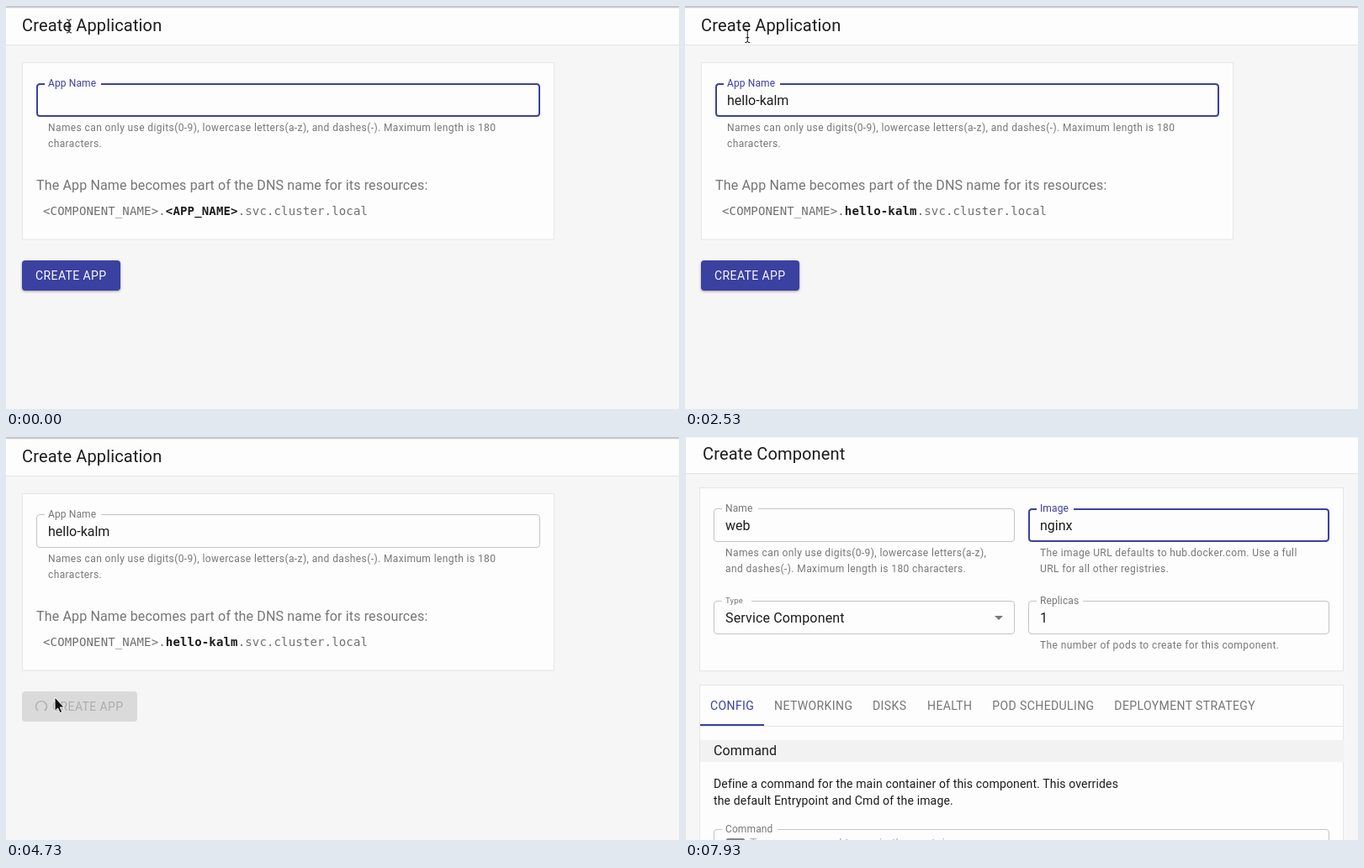
Animation of 800x480 px, one loop 8000 ms. Source, as an HTML page:

```html
<!DOCTYPE html>
<html lang="en">
<head>
<meta charset="utf-8">
<title>Create Application</title>
<style>
html, body { margin: 0; width: 100%; height: 100%; overflow: hidden; background: #f6f6f6; }
svg { display: block; width: 800px; height: 480px; }
text { font-family: Roboto, "Noto Sans", sans-serif; white-space: pre; fill: #1c1c1c; }
.title { font-size: 20px; letter-spacing: .15px; }
.body { font-size: 16px; letter-spacing: .15px; }
.input { font-size: 16px; }
.small { font-size: 14px; letter-spacing: .15px; }
.caps { font-size: 14px; letter-spacing: .4px; }
.help { font-size: 12px; letter-spacing: .4px; fill: #777; }
.label { font-size: 12px; letter-spacing: .11px; fill: #777; }
.label.tiny { font-size: 9.6px; }
.soft { fill: #757575; }
.hint { fill: #adadad; }
.mono { font-family: "DejaVu Sans Mono", monospace; font-size: 14px; letter-spacing: .15px; fill: #707070; }
.mono .name { font-weight: 700; fill: #1c1c1c; }
.active { fill: #3a41a0; }
.paper { fill: #fdfdfd; stroke: #e6e6e6; }
.outline { fill: none; stroke: #c4c4c4; stroke-width: 1; }
.focused .outline { stroke: #3a41a0; stroke-width: 2; }
.focused .label { fill: #3a41a0; }
.line { fill: #e3e3e6; }
</style>
</head>
<body>
<svg viewBox="0 0 800 480">
  <defs>
    <clipPath id="buttonClip"><rect x="19" y="303" width="117" height="36" rx="4"/></clipPath>
  </defs>
  <rect width="800" height="480" fill="#f6f6f6"/>

  <g id="appPage">
    <rect width="800" height="46" fill="#fdfdfd"/>
    <rect width="800" height="2" fill="#c8c8cc"/>
    <rect y="2" width="800" height="1" fill="#ececee"/>
    <rect class="line" y="46" width="800" height="1"/>
    <text class="title" x="19" y="30">Create Application</text>
    <rect class="paper" x="19.5" y="67.5" width="632" height="210.5"/>
    <g id="appField"></g>
    <text class="help" x="50" y="149">Names can only use digits(0-9), lowercase letters(a-z), and dashes(-). Maximum length is 180</text>
    <text class="help" x="50" y="168">characters.</text>
    <text class="body soft" x="36" y="219">The App Name becomes part of the DNS name for its resources:</text>
    <text class="mono" x="44" y="249">&lt;COMPONENT_NAME&gt;.<tspan class="name" id="dnsName"></tspan>.svc.cluster.local</text>
    <g id="readyButton">
      <rect id="buttonFace" x="19" y="303" width="117" height="36" rx="4" fill="#3a41a0"/>
      <circle id="ripple" cx="58" cy="311" clip-path="url(#buttonClip)" fill="#fff" opacity=".25"/>
      <text class="caps" x="35" y="326" style="fill:#fafafa">CREATE APP</text>
    </g>
    <g id="busyButton">
      <rect x="19" y="303" width="137" height="36" rx="4" fill="#dadada"/>
      <circle id="spinner" cx="42" cy="321" r="6.4" fill="none" stroke="#adadad" stroke-width="1.4" pathLength="126"/>
      <text class="caps hint" x="55" y="326">CREATE APP</text>
    </g>
  </g>

  <g id="componentPage">
    <rect width="800" height="43" fill="#fdfdfd"/>
    <rect class="line" y="43" width="800" height="1"/>
    <rect class="line" width="1" height="480"/>
    <rect width="800" height="1" fill="#f0f0f0"/>
    <text class="title" x="21" y="27">Create Component</text>
    <rect class="paper" x="17.5" y="60.5" width="765" height="218"/>
    <g id="fields"></g>
    <text class="help" x="48" y="142">Names can only use digits(0-9), lowercase letters(a-z),</text>
    <text class="help" x="48" y="161">and dashes(-). Maximum length is 180 characters.</text>
    <text class="help" x="422" y="142">The image URL defaults to hub.docker.com. Use a full</text>
    <text class="help" x="422" y="161">URL for all other registries.</text>
    <text class="help" x="422" y="252">The number of pods to create for this component.</text>
    <path d="M368 213h10l-5 5z" fill="#777"/>
    <rect class="paper" x="17.5" y="295.5" width="765" height="200"/>
    <g id="tabs"></g>
    <rect class="line" x="18" y="344" width="765" height="1"/>
    <rect x="18" y="342" width="76" height="2" fill="#3a41a0"/>
    <rect x="18" y="361" width="765" height="26" fill="#f2f2f2"/>
    <text class="body" x="34" y="379">Command</text>
    <text class="small" x="34" y="418">Define a command for the main container of this component. This overrides</text>
    <text class="small" x="34" y="438">the default Entrypoint and Cmd of the image.</text>
    <g id="commandField"></g>
    <rect x="49" y="478" width="22" height="16" rx="2" fill="#858585"/>
    <text class="small hint" x="77" y="489">Type a command to run in the container</text>
  </g>

  <rect id="caret" width="1" height="19" fill="#1c1c1c"/>
  <g id="pointer">
    <path id="beam" d="M-3 -8q3 0 3 2q0 -2 3 -2M0 -6V6M-3 8q3 0 3 -2q0 2 3 2M-2 2H2" fill="none" stroke="#111"/>
    <path id="arrow" d="M0 -1V15.5L3.6 12L6.2 17.6L8.8 16.4L6.3 11H11.2Z" fill="#111" stroke="#fff"/>
    <path id="hand" d="M-1 -1Q1 -3 2.5 -.5L4.5 5Q6 3.5 7 5Q8.5 4 9.5 6Q11 5.5 11 8V11Q11 13 9.5 15H2.5Q0 12 -2.5 9Q-4 7 -1.5 6.5L1 8Z" fill="#fff" stroke="#111" stroke-width="1.1"/>
  </g>
</svg>
<script>
const LOOP = 8000;
const PRESS = 4200, SUBMIT = 4400, NEXT_PAGE = 5270, TAB_KEY = 6400;
const MOVE_START = 2440, MOVE_TIME = 750;
const $ = id => document.getElementById(id);
const show = (node, on) => node.setAttribute("display", on ? "inline" : "none");
const setAttrs = (node, attrs) => {
  for (const key in attrs) node.setAttribute(key, attrs[key]);
};

function add(parent, tag, attrs, content = "") {
  const node = document.createElementNS("http://www.w3.org/2000/svg", tag);
  setAttrs(node, attrs);
  node.textContent = content;
  return parent.appendChild(node);
}

// Outlined text field whose top edge is open behind the label
function makeField(parent, x, y, width, label, notchEnd, { value = "", hint = "", tiny = "" } = {}) {
  const group = add(parent, "g", {});
  const outline = add(group, "path", { class: "outline" });
  add(group, "text", { class: "label " + tiny, x: x + 14, y: y + (tiny ? 2.5 : 4) }, label);
  const hintText = add(group, "text", { class: "input hint", x: x + 14, y: y + 26 }, hint);
  const input = add(group, "text", { class: value ? "body" : "input", x: x + 14, y: y + 26 }, value);
  function focus(on) {
    const inset = on ? 1 : .5, r = 3.5;
    const left = x + inset, top = y + inset, right = x + width - inset, bottom = y + 40 - inset;
    group.setAttribute("class", on ? "focused" : "");
    outline.setAttribute("d", `M${notchEnd} ${top}H${right - r}Q${right} ${top} ${right} ${top + r}` +
      `V${bottom - r}Q${right} ${bottom} ${right - r} ${bottom}H${left + r}` +
      `Q${left} ${bottom} ${left} ${bottom - r}V${top + r}Q${left} ${top} ${left + r} ${top}H${x + 10}`);
  }
  focus(false);
  return {
    focus,
    type(text) {
      input.textContent = text;
      show(hintText, !text);
    },
    caretAt() {
      const length = input.textContent ? input.getComputedTextLength() : 0;
      return { x: x + 14 + length, y: y + 11 };
    }
  };
}

const appName = makeField($("appField"), 36, 92, 599, "App Name", 113);
const compName = makeField($("fields"), 34, 85, 358, "Name", 87);
const image = makeField($("fields"), 408, 85, 358, "Image", 462, { hint: "e.g. nginx:latest" });
makeField($("fields"), 34, 195, 358, "Type", 79, { value: "Service Component", tiny: "tiny" });
makeField($("fields"), 408, 195, 358, "Replicas", 473, { value: "1" });
makeField($("commandField"), 34, 467, 732, "Command", 110);

[["CONFIG", 30], ["NETWORKING", 106], ["DISKS", 223], ["HEALTH", 288],
 ["POD SCHEDULING", 365.3], ["DEPLOYMENT STRATEGY", 510.3]].forEach(([name, x], i) =>
  add($("tabs"), "text", { class: "caps " + (i ? "soft" : "active"), x, y: 325 }, name));

const keys = {
  app: { text: "hello-kalm", times: [270, 340, 470, 600, 670, 870, 1500, 1600, 1730, 1930] },
  name: { text: "web", times: [5730, 5870, 6000] },
  image: { text: "nginx", times: [6870, 7000, 7070, 7200, 7330] }
};
const typed = ({ text, times }, t) => text.slice(0, times.filter(at => at <= t).length);
const lastKey = ({ times }, t, start) => times.filter(at => at <= t).pop() ?? start;
const smooth = p => p * p * (3 - 2 * p);
const clamp = p => Math.max(0, Math.min(1, p));

function drawCaret(field, since, t) {
  const on = field && (t - since) % 1000 < 500;
  show($("caret"), on);
  if (on) setAttrs($("caret"), field.caretAt());
}

function drawPointer(t) {
  const p = smooth(clamp((t - MOVE_START) / MOVE_TIME));
  const x = 75 - 17 * p, y = 24 + 287 * p;
  const shape = t >= SUBMIT ? "arrow" : y > 303 ? "hand" : y > 255 ? "arrow" : "beam";
  show($("pointer"), t < keys.app.times[0] || t >= MOVE_START && t < NEXT_PAGE);
  $("pointer").setAttribute("transform", `translate(${x} ${y})`);
  for (const id of ["beam", "arrow", "hand"]) show($(id), id === shape);
}

function drawButton(t) {
  const press = clamp((t - PRESS) / 200);
  show($("readyButton"), t < SUBMIT);
  show($("busyButton"), t >= SUBMIT);
  $("ripple").setAttribute("r", 90 * smooth(press));
  $("buttonFace").style.filter =
    `drop-shadow(0 ${1 + 3 * press}px ${1.5 + 3 * press}px rgba(0,0,0,.35))`;
  const turn = (t - SUBMIT + 350) % 1400 / 1400;
  const grow = smooth(clamp(turn * 2)), shrink = smooth(clamp(turn * 2 - 1));
  setAttrs($("spinner"), {
    "stroke-dasharray": `${1 + 99 * grow} 200`,
    "stroke-dashoffset": -15 * grow - 110 * shrink,
    transform: `rotate(${360 * turn - 90} 42 321)`
  });
}

function draw(t) {
  const second = t >= NEXT_PAGE;
  show($("appPage"), !second);
  show($("componentPage"), second);
  if (second) {
    const onImage = t >= TAB_KEY;
    compName.focus(!onImage);
    image.focus(onImage);
    compName.type(typed(keys.name, t));
    image.type(typed(keys.image, t));
    if (onImage) drawCaret(image, lastKey(keys.image, t, TAB_KEY), t);
    else drawCaret(compName, lastKey(keys.name, t, NEXT_PAGE - 500), t);
  } else {
    const name = typed(keys.app, t);
    appName.focus(t < PRESS);
    appName.type(name);
    $("dnsName").textContent = name || "<APP_NAME>";
    drawCaret(t < PRESS && appName, lastKey(keys.app, t, -500), t);
    drawButton(t);
  }
  drawPointer(t);
}

const start = performance.now();
function tick() {
  draw((performance.now() - start) % LOOP);
  requestAnimationFrame(tick);
}
tick();
</script>
</body>
</html>
```
